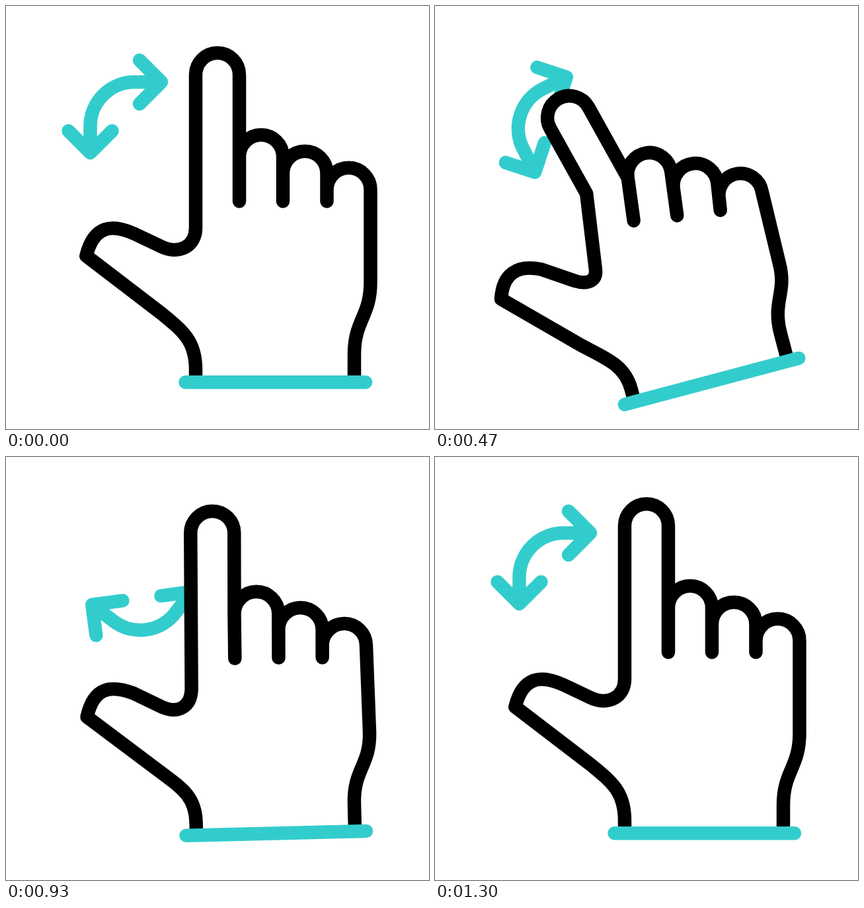
These frames come from a looping animation (640x640 px, 1.67 s). An HTML page with a canvas:

```html
<!DOCTYPE html>
<html lang="en">
<head>
<meta charset="utf-8">
<title>Rotate gesture</title>
<style>
  html, body { margin: 0; width: 100%; height: 100%; overflow: hidden; background: #fff; }
  canvas { display: block; width: 640px; height: 640px; }
</style>
</head>
<body>
<canvas id="stage" width="640" height="640"></canvas>
<script>
const ctx = document.getElementById("stage").getContext("2d");
const LOOP = 1670, STEP = 1000 / 30;
const TEAL = "#33cccc";
const WRIST = [408, 527];
const ARROW_CENTER = [201, 187];

// Each point: rest x, y, then its shift when bent, then its shift when leaning.
const THUMB = {
  wristB: [287, 507, 0, 6, 0, 14],
  wristA: [268, 492, -3, 5, 3, 18],
  heel: [235, 465, -3, 2, 7, 24],
  tip: [121.3, 378, 10.5, -11, 11.5, 20.5],
  tipA: [133, 332, 11, -1, 10, 23],
  tipB: [160, 329, 8, -6, 8, 23],
  backStart: [195, 345, 6.6, -6, 6.7, 18.5],
  backEnd: [235, 364, 12, 5.4, 8, 23],
  webA: [262, 377, 2, 3, 4, 23],
  webB: [287, 363, -8, 15, -9, 30],
  webEnd: [287, 336, -5.5, 24, -5, 32]
};
const FINGERS = {
  knuckle: [287, 212, 10.6, 34, 1, 20],
  indexL: [287, 104, -17, 33, 6, 20.5],
  indexR: [353, 104, -19, 16, 6, 23],
  notch: [353, 228, 11.2, 11, -1, 21],
  base1: [353, 295.5, 3.2, 8.6, -3, 19.5],
  middleR: [419, 228, 11, 18.4, 1, 21.8],
  base2: [419, 295.5, 2.6, 18, -2.6, 21],
  ringR: [485.5, 253, 7.6, 29, -1, 23.5],
  base3: [485.5, 295.5, 1.4, 27, -3.5, 24.5],
  littleR: [551.5, 278, 3.6, 32.8, -1.6, 25.5],
  side: [551.5, 418, 1, 4, 3, 5]
};

const smooth = u => {
  u = Math.min(1, Math.max(0, u));
  return u * u * (3 - 2 * u);
};
const mix = (a, b, u) => a + (b - a) * u;
const between = (p, q, u) => [mix(p[0], q[0], u), mix(p[1], q[1], u)];

// Keys are [time, value, power]; power above 1 delays the start of that segment.
function track(k, keys) {
  if (k <= keys[0][0]) return keys[0][1];
  for (let i = 1; i < keys.length; i++) {
    const [t0, v0] = keys[i - 1], [t1, v1, power = 1] = keys[i];
    if (k <= t1) return mix(v0, v1, smooth(((k - t0) / (t1 - t0)) ** power));
  }
  return keys[keys.length - 1][1];
}

const handAngle = k => track(k, [[3, 0], [15, -15.6, 1.6], [22.8, 18.9], [32, -15.1], [39, 0]]);
const arrowAngle = k => track(k, [[3, 0], [12, -33, 2], [39, 360]]);
const bendAmount = k => track(k, [[3, 0], [14, 1, 1.4], [22.8, 0]]);
const leanAmount = k => track(k, [[14, 0], [22.8, 1], [32, 0]]);

function pose(points, bend, lean) {
  const out = {};
  for (const [name, [x, y, bx, by, lx, ly]] of Object.entries(points))
    out[name] = [x + bend * bx + lean * lx, y + bend * by + lean * ly];
  return out;
}

function rotateAbout([x, y], degrees, draw) {
  ctx.save();
  ctx.translate(x, y);
  ctx.rotate(degrees * Math.PI / 180);
  ctx.translate(-x, -y);
  draw();
  ctx.restore();
}

const move = p => ctx.moveTo(...p);
const line = (...points) => points.forEach(p => ctx.lineTo(...p));
const curve = (a, b, p) => ctx.bezierCurveTo(...a, ...b, ...p);

// Semicircular fingertip from p to q.
function cap(p, q) {
  const dx = q[0] - p[0], dy = q[1] - p[1], a = Math.atan2(dy, dx);
  ctx.arc(p[0] + dx / 2, p[1] + dy / 2, Math.hypot(dx, dy) / 2, a + Math.PI, a + 2 * Math.PI);
}

function drawArrow() {
  ctx.strokeStyle = TEAL;
  ctx.beginPath();
  ctx.moveTo(127.5, 222);
  ctx.lineTo(127.5, 182);
  ctx.arc(194.5, 182, 67, Math.PI, 1.5 * Math.PI);
  ctx.lineTo(235, 115);
  move([94.5, 189]);
  line([127.5, 222], [160.5, 189]);
  move([202, 82]);
  line([235, 115], [202, 148]);
  ctx.stroke();
}

function drawHand(bend, lean) {
  const t = pose(THUMB, bend, lean), f = pose(FINGERS, bend, lean);
  ctx.strokeStyle = "#000";
  ctx.fillStyle = "#fff";
  ctx.beginPath();
  ctx.moveTo(287, 566);
  ctx.lineTo(287, 550);
  curve(t.wristB, t.wristA, t.heel);
  line(t.tip);
  curve(t.tipA, t.tipB, t.backStart);
  line(t.backEnd);
  curve(t.webA, t.webB, t.webEnd);
  line(f.knuckle, f.indexL);
  cap(f.indexL, f.indexR);
  line(f.notch, f.base1);

  move(f.notch);
  cap(f.notch, f.middleR);
  line(f.base2);

  const ringL = between(f.middleR, f.base2, 0.37);
  move(ringL);
  cap(ringL, f.ringR);
  line(f.base3);

  const littleL = between(f.ringR, f.base3, 0.58);
  move(littleL);
  cap(littleL, f.littleR);
  line(f.side);
  curve([f.side[0], 470], [527, 475], [527, 527]);
  ctx.lineTo(527, 566);
  ctx.fill();
  ctx.stroke();

  ctx.strokeStyle = TEAL;
  ctx.beginPath();
  ctx.moveTo(271.5, 569.3);
  ctx.lineTo(544, 569.3);
  ctx.stroke();
}

function render(ms) {
  const k = Math.floor((ms % LOOP + 4) / STEP);
  ctx.fillStyle = "#fff";
  ctx.fillRect(0, 0, 640, 640);
  ctx.lineWidth = 20.5;
  ctx.lineCap = ctx.lineJoin = "round";
  rotateAbout(ARROW_CENTER, arrowAngle(k), drawArrow);
  rotateAbout(WRIST, handAngle(k), () => drawHand(bendAmount(k), leanAmount(k)));
}

const start = performance.now();
function tick() {
  render(performance.now() - start);
  requestAnimationFrame(tick);
}
tick();
</script>
</body>
</html>
```
